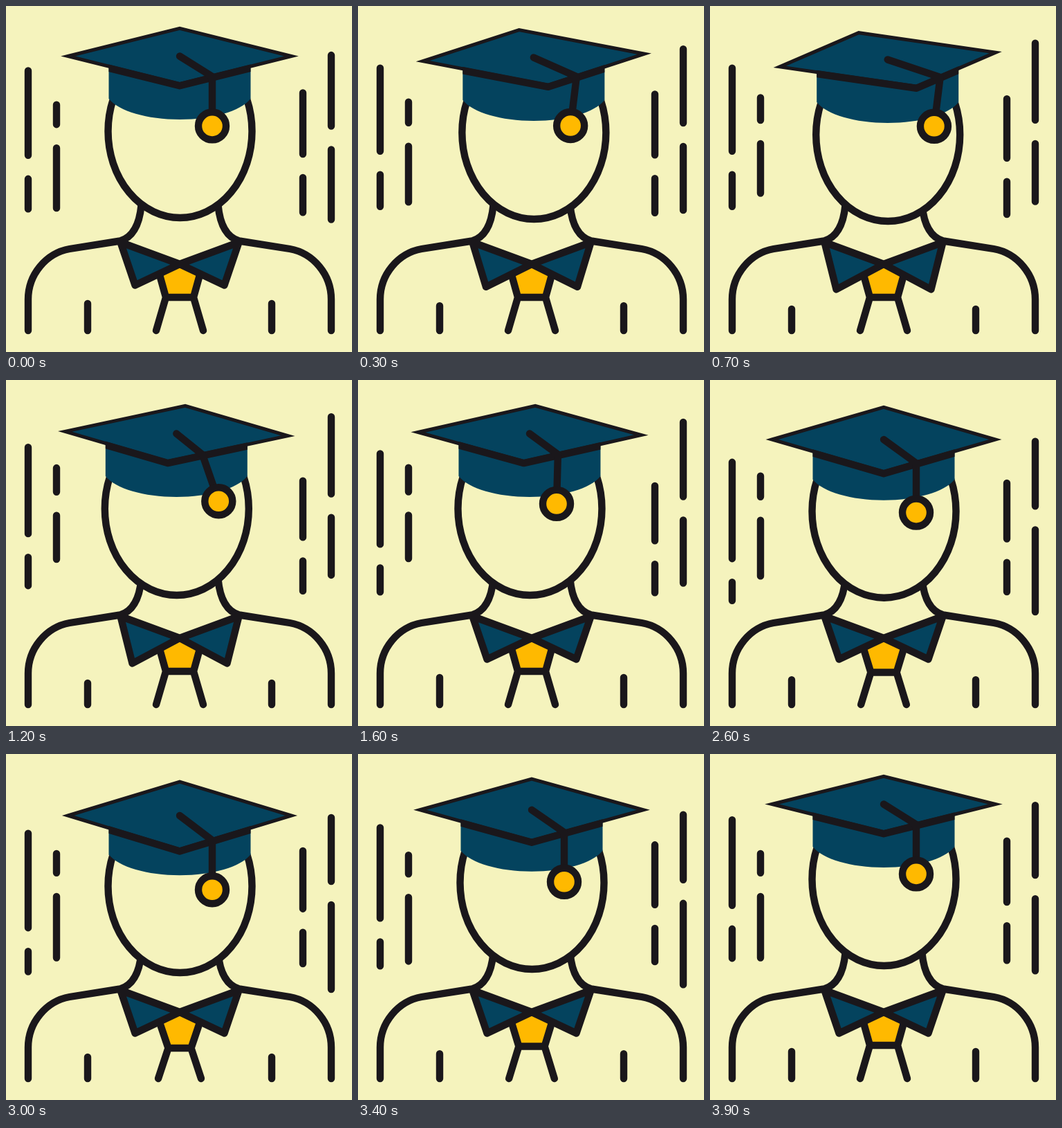
Animation of 500 by 500 pixels, one loop 4000 ms. Source, as an HTML page:

```html
<!DOCTYPE html>
<html lang="en">
<head>
<meta charset="utf-8">
<title>Graduate</title>
<style>
  html, body { margin: 0; width: 100%; height: 100%; overflow: hidden; background: #f5f3bd; }
  svg { display: block; width: 100vw; height: 100vh; }
  .ink { fill: none; stroke: #1a171b; stroke-width: 10.4; stroke-linecap: round; stroke-linejoin: round; }
  .teal { fill: #04435e; }
  .gold { fill: #ffb900; }
  .skin { fill: #f5f3bd; }
</style>
</head>
<body>
<svg viewBox="0 0 500 500">
  <defs>
    <clipPath id="capWidth"><rect x="148.5" y="0" width="205" height="300"/></clipPath>
    <path id="shoulder" d="M32 469V424C32 388 58 357 92 351L165 339.500C184 334 193 314 195.500 288"/>
  </defs>
  <g id="rain" class="ink"></g>
  <g class="ink">
    <use href="#shoulder"/>
    <use href="#shoulder" transform="matrix(-1 0 0 1 502 0)"/>
    <path id="arms"/>
    <path id="knot" class="gold" stroke="none"/>
    <path id="tie"/>
    <path id="collar" class="teal"/>
  </g>
  <g id="head">
    <ellipse id="face" class="ink skin" cx="251.500" cy="181" rx="104" ry="125"/>
    <path id="cap" class="teal" d="M148.500 80V134C163 152 204 164 251 164S339 152 353.500 134V80Z"/>
    <path id="board" class="teal" stroke="#1a171b" stroke-width="5" stroke-miterlimit="10"/>
    <g clip-path="url(#capWidth)"><path id="brim" class="ink"/></g>
    <path id="string" class="ink"/>
    <circle id="tassel" class="ink gold" r="20"/>
  </g>
</svg>
<script>
const LOOP = 4000, STEP = 100, RAD = Math.PI / 180;
const $ = id => document.getElementById(id);
const path = (id, d) => $(id).setAttribute('d', d);
const move = (id, x, y) => $(id).setAttribute('transform', `translate(${x} ${y})`);

const ease = (t, from, to) => {
  const u = Math.min(1, Math.max(0, (t - from) / (to - from)));
  return u * u * (3 - 2 * u);
};
// Rises from a to b, stays, falls from c to d.
const pulse = (a, b, c, d) => t => ease(t, a, b) - ease(t, c, d);

const lookRight = pulse(0, 600, 700, 1200);
const lookLeft = pulse(700, 1200, 1200, 2200);
const bob = pulse(0, 700, 3000, 3800);
const nod = pulse(1800, 3000, 3000, 3800);
const breath = pulse(0, 700, 1200, 1600);
const sag = pulse(2300, 3000, 3000, 3700);

const turn = t => 15 * lookRight(t) - 4.5 * lookLeft(t);
// The tassel trails behind the turning head.
const swing = t => 1.8 * (turn(t - 300) - turn(t - 100));

// Two dashes with a constant gap; top, gap and bottom sway as [middle, reach].
function column(x, peak, ...parts) {
  const el = document.createElementNS('http://www.w3.org/2000/svg', 'path');
  $('rain').append(el);
  return t => {
    const c = Math.cos((t - peak) / LOOP * 2 * Math.PI);
    const [top, gap, bottom] = parts.map(([mid, reach]) => mid + reach * c);
    el.setAttribute('d', `M${x} ${top}V${gap - 17}M${x} ${gap + 17}V${bottom}`);
  };
}
const columns = [
  column(32, 2500, [104, 15], [250.5, 25], [304, 15]),
  column(73, 3450, [136.3, 10], [184.3, 6], [278.5, 21]),
  column(429, 1980, [140.5, 15], [241, 10], [303.2, 5]),
  column(470, 2970, [72, 20], [191, 10], [310, 30])
];

function drawBody(t) {
  const out = breath(t), low = sag(t);
  path('arms', [118, 384].map(x => `M${x} ${430 + 8 * (out + low)}V469`).join(''));

  const y = 421 + 4 * low, l = 231 + 3.5 * low, r = 502 - l, foot = 217 + 3 * low;
  path('knot', `M251 372L222 384L${l} ${y}H${r}L280 384Z`);
  path('tie', `M${foot} 469L${l} ${y}L221 385M${l} ${y}H${r}L281 385M${r} ${y}L${502 - foot} 469`);

  const flap = side => `M${251 + 85.5 * side} 341.5L251 373L${251 + (64.5 + 4 * out) * side} ${403.5 + 6 * out}Z`;
  path('collar', flap(-1) + flap(1));
}

function drawHead(t) {
  const b = bob(t), n = nod(t), drop = 5 * (b + n);
  const cy = 72.5 + 5 * b + 11.5 * n, squash = .249 + .054 * n;
  const a = turn(t) * RAD, cos = Math.cos(a), sin = Math.sin(a);
  // Point on the tilted board.
  const at = (u, v) => [251 + u * cos + v * sin, cy + squash * (v * cos - u * sin)];
  const R = 161.5;
  const left = at(-R, 0), back = at(0, -R), right = at(R, 0), front = at(0, R);

  move('head', 5.7 * lookRight(t) - 4.7 * lookLeft(t), 0);
  move('face', 0, drop);
  move('cap', 0, drop + 1.3 * n);
  path('board', `M${left}L${back}L${right}L${front}Z`);
  path('brim', `M${left}L${front}L${right}`);
  move('brim', 0, 2.5);

  const hook = at(47, 118), sway = swing(t) * RAD;
  const end = [hook[0] + 71.5 * Math.sin(sway), hook[1] + 71.5 * Math.cos(sway)];
  path('string', `M${at(0, 0)}L${hook}L${end}`);
  move('tassel', ...end);
}

function tick() {
  const t = Math.floor(performance.now() % LOOP / STEP) * STEP;
  columns.forEach(draw => draw(t));
  drawBody(t);
  drawHead(t);
  requestAnimationFrame(tick);
}
tick();
</script>
</body>
</html>
```
